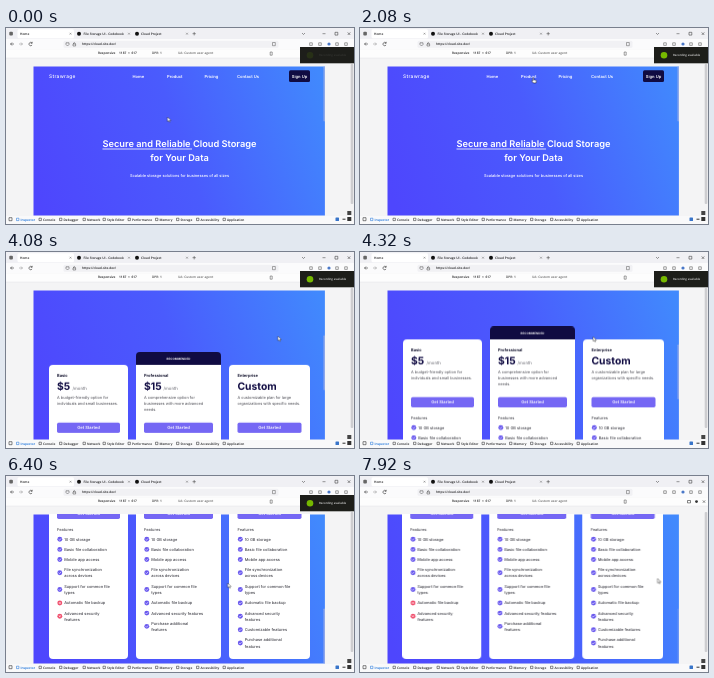
An HTML page for the animation above (8000 ms loop, 348x196 px).

```html
<!DOCTYPE html>
<html lang="en">
<head>
<meta charset="utf-8">
<title>Storage landing page</title>
<style>
html, body { margin: 0; width: 100%; height: 100%; overflow: hidden; background: #fff; }
svg { display: block; width: 100vw; height: 100vh; }
text { font-family: Inter, sans-serif; white-space: pre; text-rendering: geometricPrecision; }
.ui { font-family: "Open Sans", sans-serif; font-weight: 600; }
#toast { animation: toast 8s linear infinite; }
#note { animation: note 8s linear infinite; }
#thumb { animation: thumb 8s linear infinite; }
#signup { animation: hover 8s linear infinite; }
#hand { animation: hand 8s step-end infinite; }
#arrow { animation: arrow 8s step-end infinite; }
#cards { animation: nudge 8s step-end infinite; }
@keyframes toast { 0%, 82% { transform: none; } 86%, 100% { transform: translateX(56px); } }
@keyframes note { 0%, 1% { opacity: .12; } 6%, 100% { opacity: 1; } }
@keyframes thumb { 0%, 89% { opacity: .75; } 95%, 100% { opacity: .3; } }
@keyframes hover { 0%, 37% { fill: #100b42; } 38%, 41% { fill: #1d1860; } 43%, 100% { fill: #100b42; } }
@keyframes hand { 0% { opacity: 0; } 24% { opacity: 1; } 42% { opacity: 0; } 61% { opacity: 1; } 70% { opacity: 0; } }
@keyframes arrow { 0% { opacity: 1; } 24% { opacity: 0; } 42% { opacity: 1; } 61% { opacity: 0; } 70% { opacity: 1; } }
@keyframes nudge { 0% { transform: none; } 98% { transform: translateX(-.8px); } }
</style>
</head>
<body>
<svg viewBox="0 0 348 196" preserveAspectRatio="none">
  <defs>
    <linearGradient id="sky" gradientUnits="userSpaceOnUse" x1="28" y1="160" x2="319" y2="60">
      <stop offset="0" stop-color="#4e46fd"/>
      <stop offset=".5" stop-color="#4a5bfd"/>
      <stop offset="1" stop-color="#4189fd"/>
    </linearGradient>
    <clipPath id="view"><path d="M27.500 38.400H318.900V187.600H27.500Z"/></clipPath>
  </defs>
  <rect width="348" height="196" fill="#f4f4f5"/>
  <g id="chrome"></g>
  <g clip-path="url(#view)">
    <rect x="27" y="38" width="293" height="150" fill="url(#sky)"/>
    <g id="page"><g id="hero"></g><g transform="translate(0 254)"><g id="cards"></g></g></g>
    <g id="track"><rect id="thumb" x="317.500" y="38.500" width="1.400" height="55" rx=".7" fill="#a9b4e4"/></g>
  </g>
  <g id="toast">
    <rect x="294" y="19" width="54" height="16.300" fill="#1d1e1a"/>
    <g id="note"></g>
  </g>
  <g id="pointer">
    <path id="arrow" d="M0 0V4.600L1.100 3.600L1.900 5.300L2.700 4.900L1.900 3.300H3.400Z" fill="#fff" stroke="#222" stroke-width=".4"/>
    <path id="hand" d="M.1 -.1Q.6 -.7 1.100 -.1V1.800L3.300 2.300Q3.800 2.500 3.700 3.200L3.200 5H.6L-1 3Q-.8 2.300 .1 2.900Z" fill="#fff" stroke="#111" stroke-width=".5"/>
  </g>
</svg>
<script>
const $ = id => document.getElementById(id);

function add(parent, tag, attrs, content = '') {
  const node = document.createElementNS('http://www.w3.org/2000/svg', tag);
  for (const key in attrs) node.setAttribute(key, attrs[key]);
  node.textContent = content;
  return parent.appendChild(node);
}
const box = (g, x, y, width, height, fill, rx = 0) => add(g, 'rect', { x, y, width, height, fill, rx });
const dot = (g, cx, cy, r, fill) => add(g, 'circle', { cx, cy, r, fill });
const line = (g, d, stroke = '#333', width = .6) =>
  add(g, 'path', { d, stroke, fill: 'none', 'stroke-width': width });
const write = (g, x, y, size, fill, content, extra = {}) =>
  add(g, 'text', { x, y, 'font-size': size, fill, ...extra }, content);
const frame = $('chrome');
const ui = (x, y, content, fill = '#1c1c1e', size = 3.2) => write(frame, x, y, size, fill, content, { class: 'ui' });
const cross = (g, x, y, r, color, width) =>
  line(g, `M${x - r} ${y - r}l${2 * r} ${2 * r}m0 ${-2 * r}l${-2 * r} ${2 * r}`, color, width);

function drawBrowser() {
  box(frame, 0, 0, 348, 11, '#f0f0f4');
  box(frame, 0, 11, 348, 10.500, '#fbfbfc');
  box(frame, 0, 21.500, 348, 8.500, '#fdfdfd');
  box(frame, 0, 29.800, 348, .4, '#dcdce2');
  box(frame, 11.500, 1.300, 56.500, 9, '#fff', 1.500);
  box(frame, 3.300, 3.800, 3.600, 3.600, '#666', 1);
  ui(14, 7, 'Home');
  dot(frame, 73, 5.700, 2, '#111');
  ui(77.500, 7, 'File Storage UI - Codebook');
  dot(frame, 131, 5.700, 2, '#111');
  ui(135, 7, 'Cloud Project');
  for (const x of [64.500, 123, 181]) cross(frame, x, 5.700, .9, '#444', .4);
  line(frame, 'M186.500 5.700h3.400m-1.700-1.700v3.400M296 5l1.500 1.500 1.500-1.500M316.500 5.700h3', '#333', .5);
  line(frame, 'M329 4.300h2.800v2.800h-2.800z', '#222', .5);
  cross(frame, 343, 5.700, 1.300, '#222', .5);

  line(frame, 'M8 16H4.500l1.500-1.500m-1.500 1.500l1.500 1.500');
  line(frame, 'M13 16h3.500l-1.500-1.500m1.500 1.500l-1.500 1.500', '#999');
  line(frame, 'M26 15a1.700 1.700 0 1 0 .1 2M26.200 13.800V15.300H24.700');
  box(frame, 57.500, 12.800, 215, 7, '#f1f1f4', 1.500);
  line(frame, 'M60 14.800h3v1.700l-1.500 1.500-1.500-1.500z', '#444', .5);
  line(frame, 'M67 16h2.600v2h-2.600zM67.500 16v-1q.8-1 1.600 0v1', '#444', .5);
  ui(76, 17.300, 'https://cloud-site.dev/');
  line(frame, 'M266.500 14.500h2.800v3.200h-2.800z', '#555', .5);
  for (const x of [305, 314, 331, 340]) line(frame, `M${x - 1.300} 14.800h2.600v2.600h-2.600z`, '#444', .5);
  dot(frame, 323, 16, 1.600, '#4a78c8');

  ui(92, 26.400, 'Responsive');
  ui(113, 26.400, '1187  ×  617');
  ui(146, 26.400, 'DPR: 1', '#444');
  ui(172, 26.400, 'UA: Custom user agent', '#666');
  line(frame, 'M264.200 24h2v3.200h-2z', '#444', .5);
  line(frame, 'M327.500 24.500h3v2.400h-3z');
  dot(frame, 336.500, 25.600, 1.400, '#333');
  cross(frame, 344, 25.600, 1.200, '#222', .5);

  box(frame, 344.700, 36, 2.600, 140, '#cdcdd0', 1);
  box(frame, 0, 188, 348, 8, '#f9f9fa');
  line(frame, 'M3 189.700h3v3h-3z');
  const tools = [[10.500, 'Inspector'], [33, 'Console'], [53.500, 'Debugger'], [77, 'Network'], [97, 'Style Editor'],
    [122, 'Performance'], [149.500, 'Memory'], [170.500, 'Storage'], [190.500, 'Accessibility'], [217, 'Application']];
  tools.forEach(([x, name], i) => {
    const color = i ? '#1c1c1e' : '#0a68d8';
    line(frame, `M${x} 190.200h2.400v2.400h-2.400z`, color, .5);
    ui(x + 4, 192.500, name, color);
  });
  box(frame, 329.500, 189.500, 3.500, 3.500, '#3975c9', .6);
  box(frame, 336.500, 190.700, 3, 1, '#333');
  box(frame, 341.300, 183, 4, 4, '#444');
  box(frame, 341.300, 189, 4, 4, '#333');
}

function drawHero() {
  const hero = $('hero');
  const bold = { 'font-weight': 600 };
  write(hero, 43, 50, 4.900, '#fff', 'Strawrage', { 'font-weight': 500, 'letter-spacing': .3 });
  for (const [x, name] of [[126.500, 'Home'], [161, 'Product'], [198.500, 'Pricing'], [231, 'Contact Us']])
    write(hero, x, 49.800, 4.100, '#fff', name, bold);
  box(hero, 283, 42.300, 21, 11.700, '#100b42', 1.500).id = 'signup';
  const middle = { ...bold, 'text-anchor': 'middle' };
  write(hero, 293.500, 49.800, 4.100, '#fff', 'Sign Up', middle);
  write(hero, 173.500, 119.300, 9.250, '#fff', 'Secure and Reliable Cloud Storage', middle);
  box(hero, 96.500, 120.600, 89.500, .8, '#fff');
  write(hero, 173.500, 133.300, 9.250, '#fff', 'for Your Data', middle);
  write(hero, 173.500, 148.800, 3.950, '#fff', 'Scalable storage solutions for businesses of all sizes',
    { 'font-weight': 500, 'text-anchor': 'middle' });
}

const shared = ['10 GB storage', 'Basic file collaboration', 'Mobile app access',
  'File synchronization|across devices', 'Support for common file|types', 'Automatic file backup'];
const plans = [
  { x: 43, w: 79, pad: 8, name: 'Basic', price: '$5', priceWidth: 15.500, missing: 5,
    about: 'A budget-friendly option for|individuals and small businesses.',
    features: ['Advanced security|features'] },
  { x: 130, w: 85, pad: 8, name: 'Professional', price: '$15', priceWidth: 19.500, missing: 99, featured: true,
    about: 'A comprehensive option for|businesses with more advanced|needs.',
    features: ['Advanced security features', 'Purchase additional|features'] },
  { x: 223, w: 81, pad: 8.500, name: 'Enterprise', price: 'Custom', missing: 99,
    about: 'A customizable plan for large|organizations with specific needs.',
    features: ['Advanced security|features', 'Customizable features', 'Purchase additional|features'] }
];

function drawFeature(g, x, y, label, included) {
  const lines = label.split('|');
  const mid = y + (lines.length - 1) * 3.150;
  dot(g, x + 2.800, mid, 2.450, included ? '#6a59ee' : '#f0516f');
  if (included) line(g, `M${x + 1.600} ${mid}l.9 .9 1.600-1.800`, '#fff', .6);
  else cross(g, x + 2.800, mid, .85, '#fff', .6);
  lines.forEach((part, i) => write(g, x + 7.200, y + 1.400 + i * 6.300, 3.950, '#43434b', part, { 'font-weight': 500 }));
  return y + (lines.length > 1 ? 16.700 : 10.100);
}

function drawPlan(plan) {
  const g = $('cards'), left = plan.x + plan.pad, center = plan.x + plan.w / 2;
  const middle = { 'font-weight': 600, 'text-anchor': 'middle' };
  if (plan.featured) {
    box(g, plan.x, -29, plan.w, 40, '#100b42', 4);
    write(g, center, -21.300, 3, '#fff', 'RECOMMENDED', middle);
  }
  box(g, plan.x, -16, plan.w, 208, '#fff', 4);
  if (plan.featured) box(g, plan.x, -16, plan.w, 6, '#fff');
  write(g, left, -3.600, 4, '#161630', plan.name, { 'font-weight': 700 });
  write(g, left, 9, 10.300, '#100b42', plan.price, { 'font-weight': 700 });
  if (plan.priceWidth) write(g, left + plan.priceWidth, 9, 4.300, '#66666f', '/month');
  plan.about.split('|').forEach((part, i) => write(g, left, 17.700 + i * 6.200, 3.900, '#4a4a52', part));
  box(g, left, 41.700, plan.w - 2 * plan.pad, 10.300, '#7567f4', 1.700);
  write(g, center, 48.300, 4.100, '#fff', 'Get Started', middle);
  write(g, left, 64.400, 3.950, '#4a4a52', 'Features', { 'font-weight': 500 });
  let y = 72.300;
  [...shared, ...plan.features].forEach((label, i) => {
    y = drawFeature(g, left, y, label, i < plan.missing);
  });
}

// Each stop is [ms, x, y].
function move(id, stops) {
  $(id).animate(stops.map(([ms, x, y]) => ({ offset: ms / 8000, transform: `translate(${x}px, ${y}px)` })),
    { duration: 8000, iterations: Infinity });
}

drawBrowser();
drawHero();
plans.forEach(drawPlan);
dot($('note'), 304, 27.300, 3.300, '#76b900');
write($('note'), 313, 28.300, 2.900, '#ddd', 'Recording available', { class: 'ui' });

const scroll = [[0, 0], [3800, 0], [4080, 125], [4240, 150], [4320, 150], [4480, 254], [6240, 254], [6400, 263], [8000, 263]];
move('page', scroll.map(([ms, y]) => [ms, 0, -y]));
move('track', scroll.map(([ms, y]) => [ms, 0, y * 94 / 263]));
move('pointer', [
  [0, 161.500, 89], [80, 161.500, 89], [360, 105, 66], [640, 53, 47], [960, 53, 47], [1400, 105, 114],
  [1760, 177, 114], [1840, 172, 104], [1960, 130, 48], [2080, 172.500, 50], [2320, 205, 49], [2640, 251, 48],
  [2720, 251, 48], [3120, 293, 49], [3280, 293, 49], [3520, 309, 66], [3680, 308, 70], [3760, 304, 79.500],
  [4000, 285, 84], [4320, 233, 84.500], [4560, 240, 100], [4720, 255, 150], [4880, 262, 50], [5040, 186, 45],
  [5360, 58, 48], [5520, 58, 48], [5680, 82, 120], [5840, 150, 176], [6080, 270, 55], [6240, 250, 80],
  [6400, 221.500, 107], [6640, 255, 120], [7040, 297.500, 102.500], [8000, 297.500, 102.500]
]);
</script>
</body>
</html>
```
